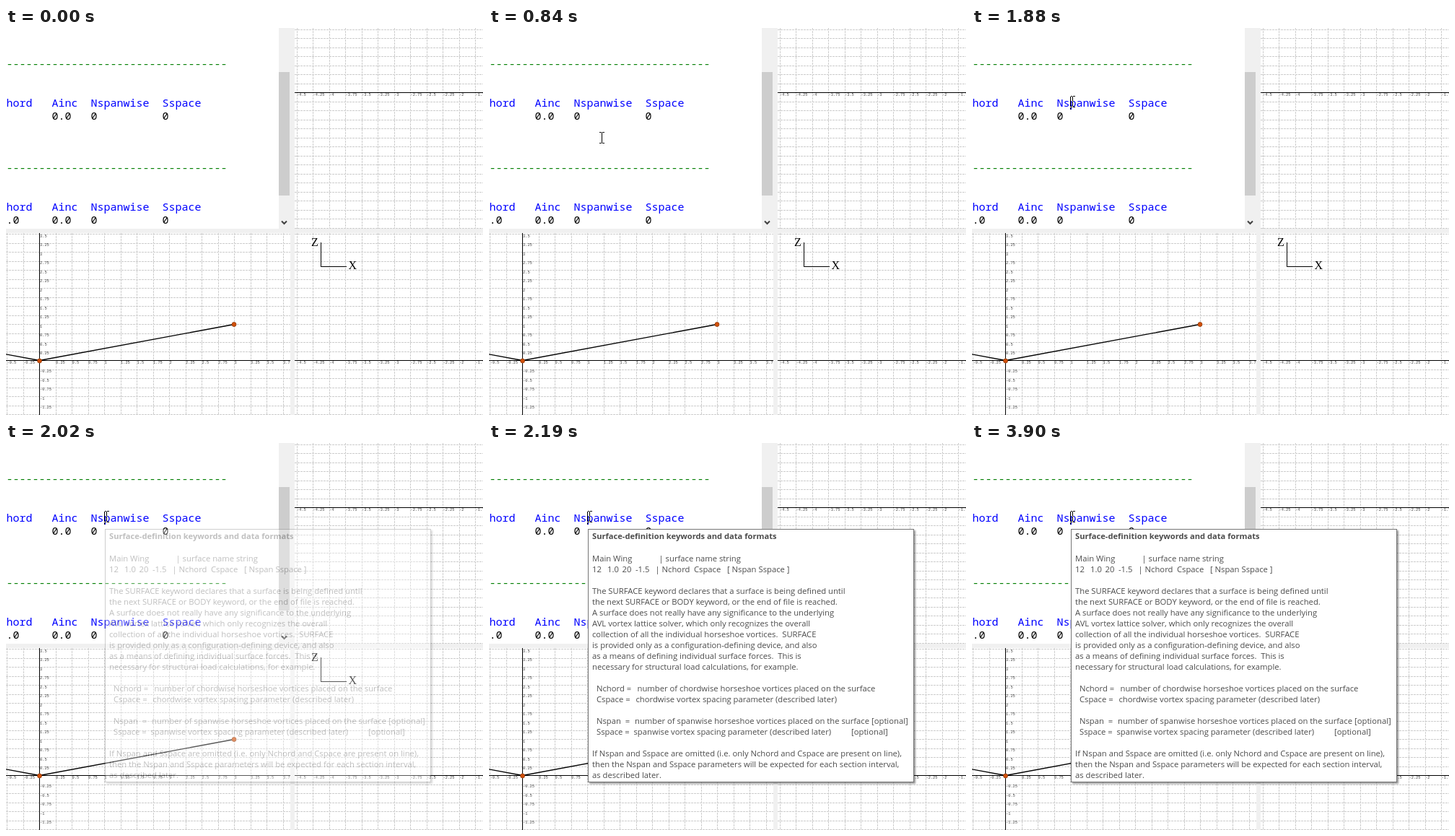
An HTML page that plays this animation: 661 by 536 pixels, repeating every 3980 ms.

```html
<!DOCTYPE html>
<html lang="en">
<head>
<meta charset="utf-8">
<title>Geometry editor tooltip</title>
<style>
  html, body { margin: 0; width: 100%; height: 100%; overflow: hidden; background: #fff; }
  #stage { display: block; width: 661px; height: 536px; isolation: isolate; }
  text { white-space: pre; }
  .code { font: 15px "Noto Sans Mono", monospace; }
  .tick { font: 5.33px "Liberation Mono", monospace; fill: #444; }
  .axis { font: 16px "Liberation Serif", serif; }
  .tip { font: 11.25px "Open Sans", sans-serif; fill: #4c4c4c; }
  .title { font-size: 11.15px; font-weight: bold; }
  .grid { stroke: #cdcdcd; stroke-dasharray: 3 1; shape-rendering: crispEdges; }
  .crisp { shape-rendering: crispEdges; }
  .box { fill: #fff; stroke: #767676; filter: drop-shadow(2.5px 2.5px .8px rgba(0, 0, 0, .4)); }
  #beam { fill: #fff; mix-blend-mode: difference; }
</style>
</head>
<body>
<svg id="stage" viewBox="0 0 661 536"></svg>
<script>
const stage = document.getElementById('stage');

function add(parent, tag, attrs = {}, text) {
  const el = document.createElementNS('http://www.w3.org/2000/svg', tag);
  for (const [key, value] of Object.entries(attrs)) el.setAttribute(key, value);
  if (text !== undefined) el.textContent = text;
  parent.append(el);
  return el;
}
const rect = (parent, x, y, width, height, fill) =>
  add(parent, 'rect', { x, y, width, height, fill, class: 'crisp' });
const label = (parent, cls, x, y, text, fill) =>
  add(parent, 'text', { class: cls, x, y, ...(fill && { fill }) }, text);

// A clipped region that keeps stage coordinates
function pane(x, y, width, height) {
  const el = add(stage, 'svg', { x, y, width, height, viewBox: `${x} ${y} ${width} ${height}` });
  rect(el, x, y, width, height, '#fff');
  return el;
}

const STEP_X = 22.5, STEP_Y = 12.5;

function plot(x, y, w, h, originX, originY) {
  const p = pane(x, y, w, h);
  const range = (from, to) => Array.from({ length: to - from + 1 }, (_, i) => from + i);
  const cols = range(Math.ceil((x - originX) / STEP_X) - 1, Math.floor((x + w - originX) / STEP_X));
  const rows = range(Math.ceil((y - originY) / STEP_Y) - 1, Math.floor((y + h - originY) / STEP_Y));
  const colX = k => Math.floor(originX + k * STEP_X);
  const rowY = k => Math.floor(originY + k * STEP_Y);
  const lines = cols.map(k => `M${colX(k) + .5} ${y}v${h}`)
    .concat(rows.map(k => `M${x} ${rowY(k) + .5}h${w}`));
  add(p, 'path', { class: 'grid', d: lines.join(''), fill: 'none' });
  rect(p, x, Math.floor(originY), w, 1, '#000');
  for (const k of cols) if (k) label(p, 'tick', originX + k * STEP_X, originY + 4, k / 4);
  if (originX > x && originX < x + w) {
    rect(p, Math.floor(originX), y, 1, h, '#000');
    for (const k of rows) if (k) label(p, 'tick', originX + .5, originY + k * STEP_Y + 4, -k / 4);
  }
  return p;
}

rect(stage, 0, 0, 661, 536, '#f0f0f0');

// Text editor
const editor = pane(0, 0, 378, 278);
const BLUE = '#0000ff';
for (const [y, first] of [[109, ''], [253, '.0']]) {
  label(editor, 'code', .5, y - 54, '-'.repeat(34), '#008000');
  label(editor, 'code', .5, y, 'hord   Ainc  Nspanwise  Sspace', BLUE);
  label(editor, 'code', .5, y + 18, first.padEnd(7) + '0.0   0          0', '#000');
}
rect(stage, 378, 61, 15, 171, '#cdcdcd');
add(stage, 'path', { d: 'M382 267.5l3.5 3.5l3.5-3.5', fill: 'none', stroke: '#404040', 'stroke-width': 2 });

// Views
plot(400, 0, 261, 278, 808, 89.5);
const front = plot(0, 284, 394, 252, 46.5, 460.5);
const side = plot(400, 284, 261, 252, 808, 460.5);

add(front, 'path', { d: 'M-224 410.5L46.5 460.5L316 410.5', fill: 'none', stroke: '#000', 'stroke-width': 1.4 });
for (const [cx, cy] of [[46.5, 461], [316, 410.5]])
  add(front, 'circle', { cx, cy, r: 3, fill: '#d2500a', stroke: '#8f3a0c', 'stroke-width': .8 });

add(side, 'path', { class: 'crisp', d: 'M436.5 297V330.5H472', fill: 'none', stroke: '#000' });
label(side, 'axis', 423, 301.5, 'Z');
label(side, 'axis', 474.5, 334, 'X');

// Tooltip
const tip = add(stage, 'g');
add(tip, 'rect', { class: 'box', x: 137.5, y: 119.5, width: 451, height: 350 });
label(tip, 'tip title', 143, 133, 'Surface-definition keywords and data formats');
// Row, then pairs of x and text
const TIP = [
  [0, 143, 'Main Wing', 235.5, '| surface name string'],
  [1, 143, '12', 164, '1.0', 184.5, '20', 203, '-1.5', 230.5, '| Nchord', 284, 'Cspace', 330, '[ Nspan Sspace ]'],
  [3, 143, 'The SURFACE keyword declares that a surface is being defined until'],
  [4, 143, 'the next SURFACE or BODY keyword, or the end of file is reached.'],
  [5, 143, 'A surface does not really have any significance to the underlying'],
  [6, 143, 'AVL vortex lattice solver, which only recognizes the overall'],
  [7, 143, 'collection of all the individual horseshoe vortices.  SURFACE'],
  [8, 143, 'is provided only as a configuration-defining device, and also'],
  [9, 143, 'as a means of defining individual surface forces.  This is'],
  [10, 143, 'necessary for structural load calculations, for example.'],
  [12, 149, 'Nchord =', 205.5, 'number of chordwise horseshoe vortices placed on the surface'],
  [13, 149, 'Cspace =', 203.5, 'chordwise vortex spacing parameter (described later)'],
  [15, 149, 'Nspan  =', 202, 'number of spanwise horseshoe vortices placed on the surface', 530, '[optional]'],
  [16, 149, 'Sspace =', 200.5, 'spanwise vortex spacing parameter (described later)', 502, '[optional]'],
  [18, 143, 'If Nspan and Sspace are omitted (i.e. only Nchord and Cspace are present on line),'],
  [19, 143, 'then the Nspan and Sspace parameters will be expected for each section interval,'],
  [20, 143, 'as described later.'],
];
for (const [row, ...parts] of TIP)
  for (let i = 0; i < parts.length; i += 2)
    label(tip, 'tip', parts[i], 164 + row * 15, parts[i + 1]);

// Pointer, click mark and caret
const click = add(stage, 'circle', { cx: 137, cy: 101, r: 12, fill: '#ff0', 'fill-opacity': .47 });
const caret = rect(stage, 136, 94, 1, 19, '#000');
const arrow = add(stage, 'path', {
  d: 'M.5.5v16l3.7-3.6l2.4 5.4l2.4-1l-2.4-5.3h5z', fill: '#fff', stroke: '#000'
});
const beam = add(stage, 'path', {
  id: 'beam', class: 'crisp',
  d: 'M-3-8h3v1h1v-1h3v1h-3v14h3v1h-3v-1h-1v1h-3v-1h3v-14h-3z'
});

const LOOP = 3980;
// Time, x, y, pointer kind
const POINTER = [
  [0, 0, 0, ''],
  [230, 598, 498, 'arrow'], [310, 575, 480, 'arrow'], [380, 520, 439, 'arrow'],
  [460, 435, 373, 'arrow'], [540, 342, 302, 'arrow'], [610, 264, 243, 'beam'],
  [690, 209, 201, 'beam'], [770, 178, 174, 'beam'], [840, 156, 152, 'beam'],
  [920, 147, 133, 'beam'], [1000, 143, 122, 'beam'], [1080, 141, 116, 'beam'],
  [1160, 140, 112, 'beam'], [1240, 139, 110, 'beam'], [1320, 139, 107, 'beam'],
  [1390, 139, 104, 'beam'], [1470, 139, 102, 'beam'],
];
const FADE = [[0, 0], [2020, .35], [2110, .65], [2190, 1]];
const CLICK = [[0, 0], [1790, 1], [1880, 0]];
const CARET = [[0, 0], [1790, 1], [2340, 0], [2870, 1], [3330, 0], [3900, 1]];

const at = (steps, t) => steps.findLast(step => step[0] <= t);

function draw(t) {
  const [, x, y, kind] = at(POINTER, t);
  for (const [el, name] of [[arrow, 'arrow'], [beam, 'beam']]) {
    el.setAttribute('transform', `translate(${x} ${y})`);
    el.style.display = kind === name ? '' : 'none';
  }
  for (const [el, steps] of [[tip, FADE], [click, CLICK], [caret, CARET]])
    el.style.opacity = at(steps, t)[1];
}

let start;
function tick(now) {
  start ??= now;
  draw((now - start) % LOOP);
  requestAnimationFrame(tick);
}
draw(0);
requestAnimationFrame(tick);
</script>
</body>
</html>
```
